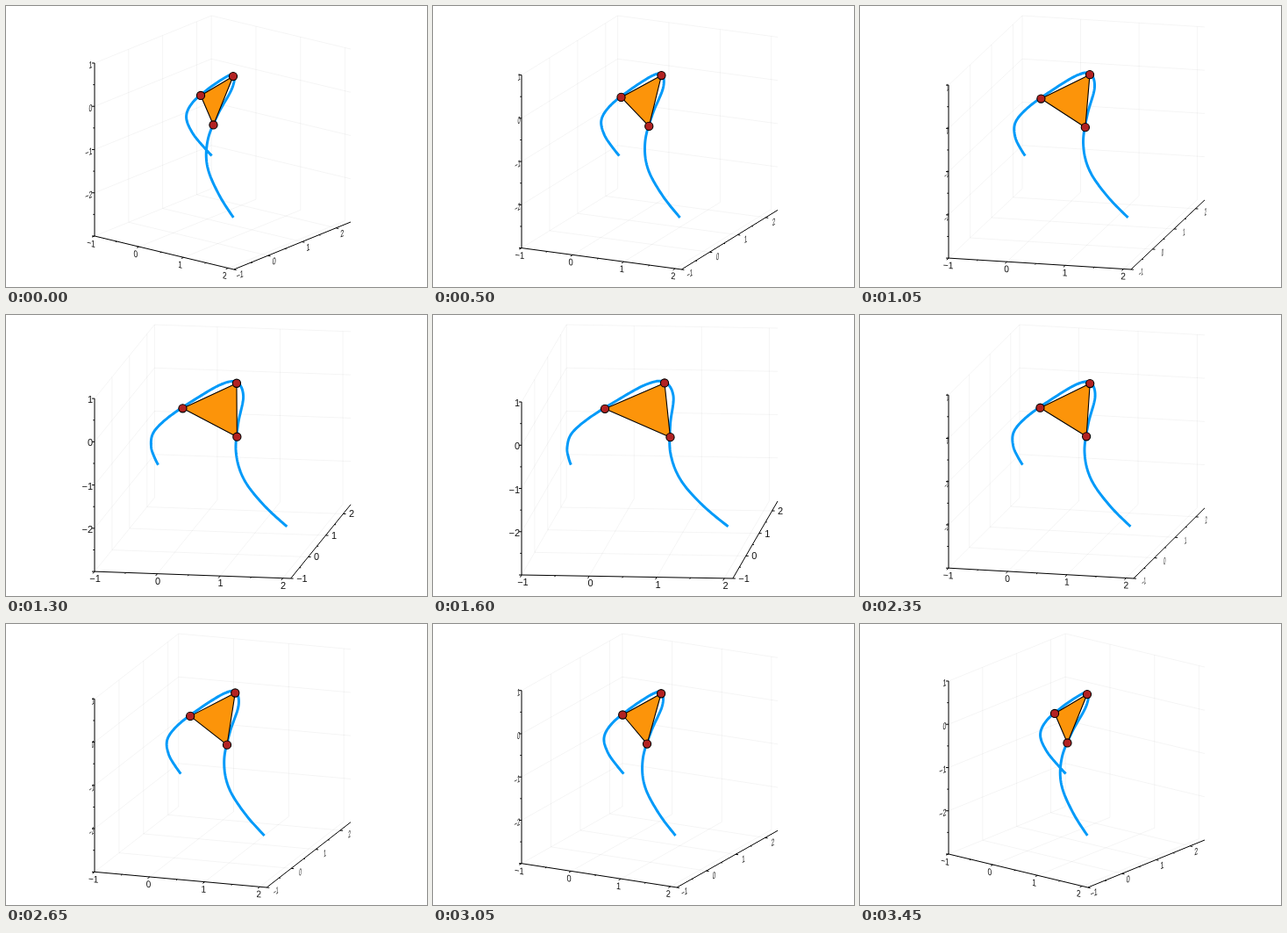
Animation, 480 px wide and 320 px high, one loop 3500 ms. Source, as an HTML page with a canvas:

```html
<!DOCTYPE html>
<html>
<head>
<meta charset="utf-8">
<style>
html, body { margin: 0; width: 100%; height: 100%; overflow: hidden; background: #fff; }
canvas { display: block; }
</style>
</head>
<body>
<canvas id="stage" width="480" height="320"></canvas>
<script>
const ctx = document.getElementById('stage').getContext('2d');
const LEFT = 101, BOTTOM = 300, WIDTH = 292, DEPTH = 92, HEIGHT = 197;
const MIN = [-1, -1, -3], MAX = [2.125, 2.43, 1];
const CORNERS = [[-.157, 1.013, -.186], [.778, .742, .576], [1.041, -.182, -.188]];

// The curve is even in d = y - x: x + y and z, sampled at steps of 0.5.
const SUM = [1.545, 1.425, 1.01, .68, .6, .82, 1.2, 1.66, 2.16];
const RISE = [.585, .42, 0, -.45, -.91, -1.42, -1.93, -2.47, -3.03];

function sample(values, d) {
  const t = Math.abs(d) / .5, i = Math.floor(t), f = t - i;
  const [a, b, c, e] = [-1, 0, 1, 2].map(k => values[Math.abs(i + k)]);
  return b + f / 2 * (c - a + f * (2 * a - 5 * b + 4 * c - e + f * (3 * (b - c) + e - a)));
}

const curve = [];
for (let i = 0; i <= 160; i++) {
  const d = 3.24 - 6.17 * i / 160, s = sample(SUM, d);
  curve.push([(s - d) / 2, (s + d) / 2, sample(RISE, d)]);
}

function path(points, closed) {
  ctx.beginPath();
  points.forEach(p => ctx.lineTo(...p));
  if (closed) ctx.closePath();
}

function line(points, color, width) {
  path(points);
  ctx.strokeStyle = color;
  ctx.lineWidth = width;
  ctx.stroke();
}

function label(value, x, y, align, [a, b]) {
  ctx.save();
  ctx.transform(a, b, 0, 1, x, y);
  ctx.textAlign = align;
  ctx.fillText(String(value).replace('-', '\u2212'), 0, 4);
  ctx.restore();
}

function draw(deg) {
  const az = deg * Math.PI / 180, sin = Math.sin(az), cos = Math.cos(az);
  const scale = WIDTH / (sin + cos);
  const project = p => {
    const [u, v, w] = p.map((n, i) => (n - MIN[i]) / (MAX[i] - MIN[i]));
    return [LEFT + scale * (u * cos + v * sin),
      BOTTOM - DEPTH * ((1 - u) * sin * sin + v * cos * cos) - HEIGHT * w];
  };
  const [x0, y0, z0] = MIN, [x1, y1, z1] = MAX;
  const lines = (...points) => points.map(project);

  ctx.fillStyle = '#fff';
  ctx.fillRect(0, 0, 480, 320);

  // Grid on the floor and the two back walls
  const grid = (...points) => line(lines(...points), 'rgba(0,0,0,.045)', 1);
  for (let n = -1; n <= 2; n++) {
    grid([n, y0, z0], [n, y1, z0], [n, y1, z1]);
    grid([x1, n, z0], [x0, n, z0], [x0, n, z1]);
  }
  for (let n = -2; n <= 1; n++) grid([x0, y0, n], [x0, y1, n], [x1, y1, n]);

  line(lines([x0, y0, z1], [x0, y0, z0], [x1, y0, z0], [x1, y1, z0]), '#000', 1);

  // Flat labels at small angles, labels lying along the axes otherwise
  const flat = deg < 20;
  const alongX = flat ? [1, 0] : [cos, DEPTH * sin * sin / scale];
  const alongY = flat ? [1, 0] : [sin, -DEPTH * cos * cos / scale];
  const unit = ([a, b]) => [a / Math.hypot(a, b), b / Math.hypot(a, b)];
  const xDir = unit([scale * cos, DEPTH * sin * sin]);
  const yDir = unit([scale * sin, -DEPTH * cos * cos]);
  ctx.font = '11px "Liberation Sans", Arial, sans-serif';

  function tick([x, y], [dx, dy], major) {
    const size = major ? 3 : 1.7;
    line([[x, y], [x + dx * size, y + dy * size]], '#000', 1);
  }

  for (let n = -3; n <= 2; n += .5) {
    const major = Number.isInteger(n);
    ctx.fillStyle = '#111';
    if (n >= -1) {
      const px = project([n, y0, z0]), py = project([x1, n, z0]);
      tick(px, [-yDir[0], -yDir[1]], major);
      tick(py, xDir, major);
      if (major) {
        label(n, px[0] + 3.8 - .195 * deg, px[1] + 8, 'center', alongX);
        if (flat) label(n, py[0] + 6.5, py[1], 'left', alongY);
        else label(n, py[0] + 17 - .25 * deg, py[1] + .3 + .14 * deg, 'center', alongY);
      }
    }
    if (n <= 1) {
      const pz = project([x0, y0, n]);
      tick(pz, [-1, 0], major);
      if (major && n > -3) label(n, flat ? 99 : 104 - .14 * deg, pz[1] + 1, 'right', alongY);
    }
  }

  ctx.lineJoin = 'round';
  line(curve.map(project), '#009af9', 3);

  const corners = CORNERS.map(project);
  path(corners, true);
  ctx.fillStyle = '#fc940a';
  ctx.fill();
  ctx.strokeStyle = '#000';
  ctx.lineWidth = 1.1;
  ctx.stroke();
  for (const [x, y] of corners) {
    ctx.beginPath();
    ctx.arc(x, y, 4.6, 0, 7);
    ctx.fillStyle = '#b22222';
    ctx.fill();
    ctx.stroke();
  }
}

function frame() {
  const step = Math.floor(performance.now() / 50) % 70;
  draw(40 - Math.round(30 * Math.min(step, 69 - step) / 34.5));
  requestAnimationFrame(frame);
}
frame();
</script>
</body>
</html>
```
